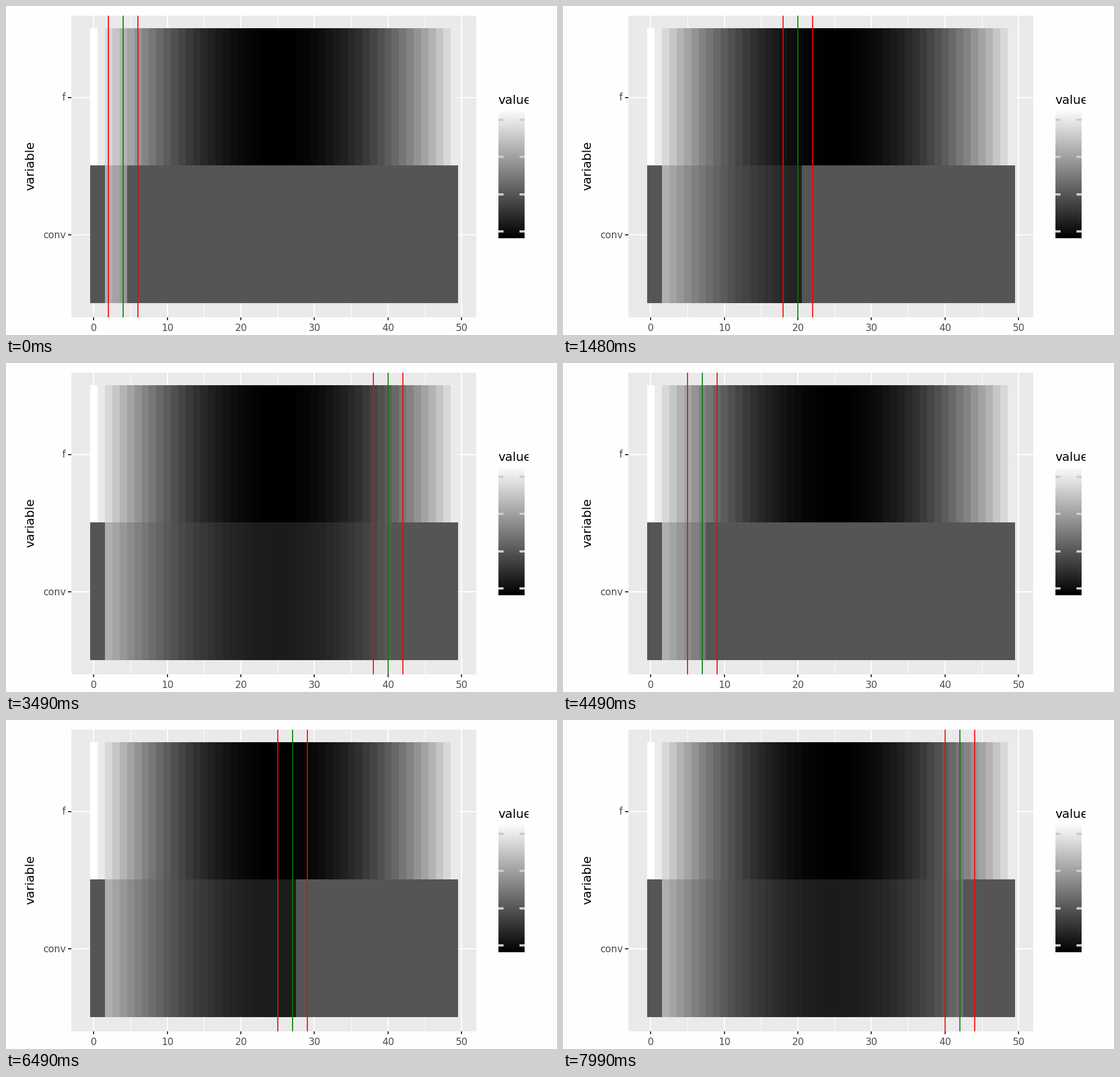
A matplotlib script for the animation above (8490 ms loop, 969 by 578 pixels).

```python
import numpy as np
import matplotlib.pyplot as plt
from matplotlib.animation import FuncAnimation
from matplotlib.patches import Rectangle

W, H, DPI = 969, 578, 64
STEP, LOOP = 30, 8490
N = 50
X0, DX = 154.3, 12.94              # pixel position of x = 0, pixels per unit
LEFT, RIGHT, TOP, BOTTOM = 115, 827, 17, 547
ROW_F, ROW_CONV = 161, 402

# Window centre of each pass and the moment it appears
CENTRES = [4, 9, 14, 20, 25, 30, 35, 40, 2, 7, 12, 17, 22, 27, 32, 37, 42]
STARTS = [0, 500, 980, 1480, 1990, 2490, 2990, 3490, 3990,
          4490, 4990, 5490, 5990, 6490, 6990, 7490, 7990]

plt.rcParams["font.family"] = "DejaVu Sans"


def pt(px):
    return px * 72 / DPI


def sx(v):
    return X0 + DX * v


def line(xs, ys, color, width, z):
    return ax.plot(xs, ys, color=color, lw=pt(width), zorder=z,
                   solid_capstyle="butt")[0]


def label(x, y, text, size, color, **kw):
    ax.text(x, y, text, fontsize=pt(size), color=color, va="baseline",
            zorder=6, **kw)


def box(x, y, w, h, color, z):
    ax.add_patch(Rectangle((x, y), w, h, fc=color, lw=0, zorder=z))


# Signal: centred parabola; the smoothed row uses a five-tap Gaussian
x = np.arange(N)
f = (x - 25.0) ** 2
mean = f.mean()
f -= mean
taps = np.arange(-2, 3)
kernel = np.exp(-taps ** 2 / (2 * 2.5 ** 2)) / (2.5 * np.sqrt(2 * np.pi))
conv = np.zeros(N)
conv[2:-2] = np.convolve(f, kernel, mode="valid")

fig = plt.figure(figsize=(W / DPI, H / DPI), dpi=DPI, facecolor="#fefefe")
ax = fig.add_axes([0, 0, 1, 1])
ax.axis("off")

# Panel, grid and axes
box(LEFT, TOP, RIGHT - LEFT, BOTTOM - TOP, "#eaeaea", 0)
for v in range(0, 51, 5):
    major = v % 10 == 0
    line([sx(v)] * 2, [TOP, BOTTOM], "white", 2 if major else 1, 1)
    if major:
        line([sx(v)] * 2, [BOTTOM, BOTTOM + 5], "#333333", 2, 1)
        label(sx(v), 571, str(v), 17, "#4d4d4d", ha="center")
for y, name in ((ROW_F, "f"), (ROW_CONV, "conv")):
    line([LEFT, RIGHT], [y, y], "white", 2, 1)
    line([LEFT - 6, LEFT], [y, y], "#333333", 2, 1)
    label(105, y + 5.5, name, 17, "#4d4d4d", ha="right")
label(49, 280.5, "variable", 21.5, "black", ha="center", rotation=90,
      rotation_mode="anchor")

# Legend, cut off at its right edge
label(865.5, 172.5, "value", 21.5, "black", ha="left")
box(919, 140, 50, 50, "#fefefe", 7)
ax.imshow(np.linspace(1, 0, 256)[:, None], cmap="gray", aspect="auto",
          extent=(866, 912, 408, 180), zorder=2)
for y in (200, 265, 330.5, 395.5):
    for left in (866, 903):
        box(left, y - 2, 9.5, 4, "#cccccc", 3)

# Moving parts
tiles = ax.imshow(np.zeros((2, N)), cmap="gray", vmin=-mean, vmax=625 - mean,
                  aspect="auto", interpolation="nearest", zorder=2,
                  extent=(sx(-0.5), sx(N - 0.5), 522.5, 40.3))
markers = [(off, line([0, 0], [TOP, BOTTOM], color, 1.8, 4))
           for off, color in ((-2, "red"), (0, "green"), (2, "red"))]

ax.set_xlim(0, W)
ax.set_ylim(H, 0)


def update(i):
    k = np.searchsorted(STARTS, i * STEP + 20, side="right") - 1
    centre = CENTRES[k]
    tiles.set_data(np.vstack([f, np.where(x <= centre, conv, 0)]))
    for off, marker in markers:
        marker.set_xdata([sx(centre + off)] * 2)
    return [tiles] + [m for _, m in markers]


anim = FuncAnimation(fig, update, frames=LOOP // STEP, interval=STEP,
                     repeat=True, repeat_delay=0, blit=False)
plt.show()
```
